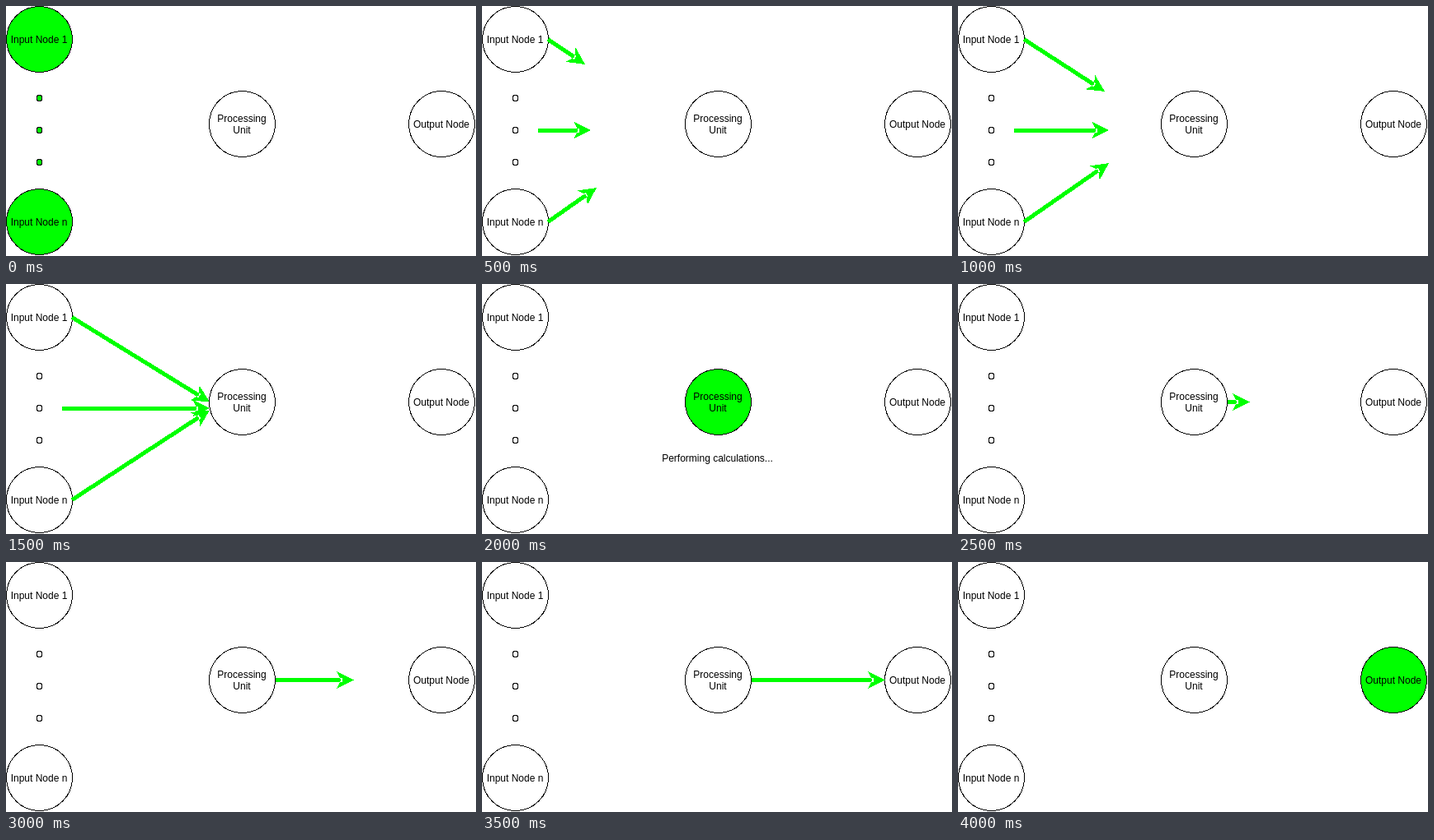
These frames come from a looping animation (570 by 304 pixels, 4500 ms). An HTML page:

```html
<!DOCTYPE html>
<html lang="en">
<head>
<meta charset="utf-8">
<title>Node signal flow</title>
<style>
  html, body { margin: 0; width: 100%; height: 100%; overflow: hidden; background: #fff; }
  svg { display: block; width: 570px; height: 304px; }
  circle { fill: #fff; stroke: #000; shape-rendering: crispEdges; }
  circle.on { fill: #0f0; }
  text { font: 12px "Liberation Sans", Arial, sans-serif; text-anchor: middle; }
  .arrow { fill: #0f0; stroke: none; shape-rendering: crispEdges; }
</style>
</head>
<body>
<svg id="stage" viewBox="0 0 570 304"></svg>
<script>
const STEP = 500, STEPS = 9;
const stage = document.getElementById('stage');

function add(tag, attrs, content = '') {
  const el = document.createElementNS('http://www.w3.org/2000/svg', tag);
  for (const key in attrs) el.setAttribute(key, attrs[key]);
  el.textContent = content;
  return stage.appendChild(el);
}

function label(x, baseline, content) {
  return add('text', { x, y: baseline }, content);
}

function node(x, y, ...lines) {
  const circle = add('circle', { cx: x, cy: y, r: 40 });
  const first = y + 4.5 - 7 * (lines.length - 1);
  lines.forEach((line, i) => label(x - 0.5, first + 14 * i, line));
  return circle;
}

// Shaft and notched head, both laid along the x axis and then rotated.
function arrowShape([x, y], [tipX, tipY]) {
  const length = Math.hypot(tipX - x, tipY - y);
  const angle = Math.atan2(tipY - y, tipX - x) * 180 / Math.PI;
  const back = length - 21, notch = length - 15.5;
  return {
    d: `M0-2.5H${notch + 1}V2.5H0ZM${length} 0L${back}-10.5L${notch} 0L${back} 10.5Z`,
    transform: `translate(${x} ${y}) rotate(${angle})`
  };
}

const inputs = [
  node(40.5, 40.5, 'Input Node 1'),
  node(40.5, 262.5, 'Input Node n'),
  ...[112, 151, 190].map(cy => add('circle', { cx: 40.5, cy, r: 3.5 }))
];
const unit = node(286.5, 143.5, 'Processing', 'Unit');
const output = node(528.5, 143.5, 'Output Node');
const status = label(285.5, 216, 'Performing calculations...');

// Each arrow: first step, start point, then one tip per step.
const arrows = [
  { first: 1, from: [80, 40.5], tips: [[125, 71], [178, 104], [247, 143.5]] },
  { first: 1, from: [68, 151], tips: [[132, 151], [183, 151], [247, 151]] },
  { first: 1, from: [80, 262.5], tips: [[139, 221], [183, 191], [247, 153.5]] },
  { first: 5, from: [327, 143.5], tips: [[354, 143.5], [422, 143.5], [489, 143.5]] }
].map(arrow => ({ ...arrow, el: add('path', { class: 'arrow' }) }));

function show(el, visible) {
  el.style.display = visible ? '' : 'none';
}

function draw(step) {
  inputs.forEach(el => el.classList.toggle('on', step === 0));
  unit.classList.toggle('on', step === 4);
  output.classList.toggle('on', step === 8);
  show(status, step === 4);
  for (const { el, first, from, tips } of arrows) {
    const tip = tips[step - first];
    show(el, tip);
    if (!tip) continue;
    const shape = arrowShape(from, tip);
    for (const key in shape) el.setAttribute(key, shape[key]);
  }
}

const start = performance.now();
function tick() {
  draw(Math.floor((performance.now() - start) / STEP) % STEPS);
  requestAnimationFrame(tick);
}
tick();
</script>
</body>
</html>
```
